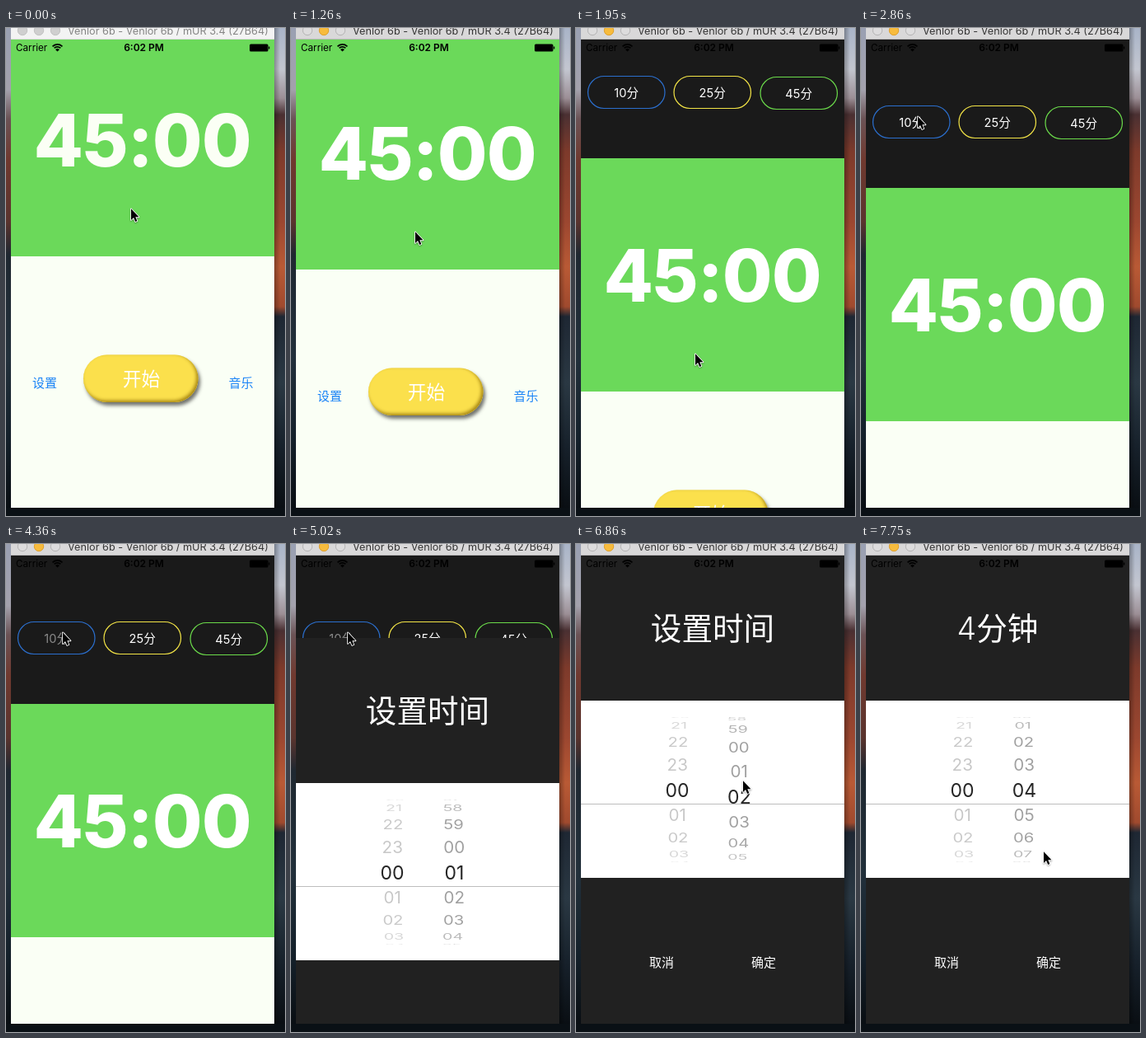
Write an HTML page with a canvas that moves like this. It is 339 px wide and 592 px high and loops after 8 s.

```html
<!DOCTYPE html>
<html lang="zh">
<head>
<meta charset="utf-8">
<title>Timer</title>
<style>
html, body { margin: 0; width: 100%; height: 100%; overflow: hidden; background: #0b0f14; }
canvas { display: block; width: 339px; height: 592px; }
</style>
</head>
<body>
<canvas id="stage"></canvas>
<script>
const W = 339, H = 592, LOOP = 8000;
const FONT = '"Inter", "Noto Sans CJK SC", "Noto Sans CJK", sans-serif';
const canvas = document.getElementById('stage');
const ctx = canvas.getContext('2d');
const ratio = window.devicePixelRatio || 1;
canvas.width = W * ratio;
canvas.height = H * ratio;

// Bursts of motion: start, number of steps, end
const BURSTS = [
  [120, 1, 120], [1200, 14, 1950], [2250, 12, 2860], [4360, 1, 4360], [4840, 10, 5380],
  [5560, 6, 5860], [6340, 3, 6450], [6800, 8, 7220], [7460, 6, 7750]
];
// Tracks: time, then values
const POINTER = [
  [1140, 152, 219], [1604, 148, 328], [1950, 145, 395], [2305, 143, 390], [2800, 72, 116],
  [2860, 69, 107], [5500, 69, 107], [5560, 92, 140], [5860, 204, 288], [6280, 204, 288],
  [6450, 198, 315], [6740, 198, 315], [7100, 213, 232], [7220, 214, 238], [7400, 214, 238],
  [7750, 222, 373]
];
const PULL = [
  [1190, 0], [1604, 95], [1950, 164], [2200, 164], [2310, 180], [2420, 193], [2540, 198], [2650, 200]
];
const MINUTE = [[6740, 1], [6920, 2.1], [7040, 3.2], [7140, 3.8], [7220, 4]];

function snap(t) {
  let s = 0;
  for (const [a, n, b] of BURSTS) {
    if (t < a) break;
    if (t >= b) { s = b; continue; }
    const step = (b - a) / (n - 1);
    s = a + Math.min(n - 1, Math.floor((t - a) / step + .25)) * step;
  }
  return s;
}

function track(keys, t) {
  if (t <= keys[0][0]) return keys[0].slice(1);
  for (let i = 1; i < keys.length; i++) {
    const a = keys[i - 1], b = keys[i];
    if (t <= b[0]) {
      const p = (t - a[0]) / (b[0] - a[0]);
      return a.slice(1).map((v, j) => v + (b[j + 1] - v) * p);
    }
  }
  return keys[keys.length - 1].slice(1);
}

// Critically damped spring for the rising sheet
function sheetOffset(t) {
  if (t >= 5380) return 0;
  const x = 14.35 * (t - 4800) / 1000;
  return x <= 0 ? 568 : Math.round(568 * (1 + x) * Math.exp(-x));
}

function box(x, y, w, h, color) {
  ctx.fillStyle = color;
  ctx.fillRect(x, y, w, h);
}

function text(str, x, y, size, color, weight = 400, align = 'center', spacing = 0) {
  ctx.font = `${weight} ${size}px ${FONT}`;
  ctx.letterSpacing = `${spacing}px`;
  ctx.textAlign = align;
  ctx.fillStyle = color;
  ctx.fillText(str, x, y);
}

function pill(x, y, w, h) {
  const r = h / 2;
  ctx.beginPath();
  ctx.arc(x + r, y + r, r, Math.PI / 2, Math.PI * 1.5);
  ctx.arc(x + w - r, y + r, r, -Math.PI / 2, Math.PI / 2);
  ctx.closePath();
}

function clip(x, y, w, h, draw) {
  ctx.save();
  ctx.beginPath();
  ctx.rect(x, y, w, h);
  ctx.clip();
  draw();
  ctx.restore();
}

function shade(dx, dy, blur, color) {
  ctx.shadowOffsetX = dx * ratio;
  ctx.shadowOffsetY = dy * ratio;
  ctx.shadowBlur = blur * ratio;
  ctx.shadowColor = color;
}

function strip(x, w, stops) {
  const g = ctx.createLinearGradient(0, 0, 0, H);
  for (const [y, color] of stops) g.addColorStop(y / H, color);
  box(x, 0, w, H, g);
}

function wallpaper() {
  strip(0, 6, [[0, '#9aa0b2'], [75, '#a3a1ac'], [110, '#6b5356'], [160, '#70392f'], [235, '#5a342e'],
    [275, '#1f2831'], [400, '#22303b'], [500, '#14202a'], [592, '#080c10']]);
  strip(326, 13, [[0, '#a9b4c8'], [50, '#c3c6d0'], [85, '#9c8f96'], [105, '#4a3032'], [150, '#7d3a2b'],
    [235, '#9c4730'], [290, '#b95a35'], [338, '#a04a2e'], [350, '#1e2733'], [430, '#2a3843'],
    [510, '#16202a'], [592, '#080c10']]);
  const g = ctx.createLinearGradient(326, 0, 333, 0);
  g.addColorStop(0, 'rgba(0,0,0,.3)');
  g.addColorStop(1, 'rgba(0,0,0,0)');
  box(326, 0, 13, H, g);
  box(0, 582, W, 10, '#0a1015');
}

function titleBar(active) {
  box(6, 0, 320, 14, active ? '#d9d8d9' : '#f3f3f3');
  box(6, 13, 320, 1, active ? '#b9b8b9' : '#dcdcdc');
  [20, 40, 60].forEach((x, i) => {
    const amber = active && i === 1;
    ctx.beginPath();
    ctx.arc(x, 3, 5.7, 0, 7);
    ctx.fillStyle = amber ? '#f7bb3d' : active ? '#dddcdd' : '#cfcfcf';
    ctx.strokeStyle = amber ? '#dfa02c' : active ? '#b5b4b5' : '#c2c2c2';
    ctx.lineWidth = 1;
    ctx.fill();
    ctx.stroke();
  });
  text('Venlor 6b - Venlor 6b / mUR 3.4 (27B64)', 75, 7.7, 12.7, active ? '#363636' : '#858585', 400, 'left');
}

function statusBar() {
  text('Carrier', 12, 28, 11.7, '#000', 400, 'left');
  text('6:02 PM', 167.5, 28, 12, '#000', 600);
  ctx.strokeStyle = '#000';
  ctx.lineWidth = 1.7;
  for (const r of [8.2, 5.2]) {
    ctx.beginPath();
    ctx.arc(62.5, 28, r, -Math.PI * .76, -Math.PI * .24);
    ctx.stroke();
  }
  ctx.fillStyle = '#000';
  ctx.beginPath();
  ctx.moveTo(62.5, 28.4);
  ctx.arc(62.5, 28.4, 3.3, -Math.PI * .76, -Math.PI * .24);
  ctx.fill();
  ctx.beginPath();
  ctx.roundRect(296, 19.5, 22.5, 9, 1.5);
  ctx.fill();
  box(319, 22.5, 1.3, 3, '#000');
}

function startButton(y) {
  const shape = () => pill(94, y, 139.5, 57.5);
  ctx.save();
  shade(2.5, 4, 4, 'rgba(0,0,0,.55)');
  shape();
  ctx.fillStyle = '#fbe04c';
  ctx.fill();
  ctx.clip();
  // Inner edge: shadow cast by a ring just outside the pill
  shade(-2, -2, 4, 'rgba(140,105,0,.8)');
  shape();
  ctx.rect(70, y - 30, 190, 120);
  ctx.fillStyle = '#fbe04c';
  ctx.fill('evenodd');
  ctx.restore();
  text('开始', 164.5, y + 37, 22.7, '#fff', 350);
}

function presets(pull, pressed) {
  const y = pull - 106;
  [['10分', 14.5, 0, '#2b6fce'], ['25分', 119, 0, '#f3e446'], ['45分', 224, 1, '#6bdb4a']]
    .forEach(([label, x, dy, color], i) => {
      pill(x, y + dy + .5, 93.5, 39);
      ctx.strokeStyle = color;
      ctx.lineWidth = 1.2;
      ctx.stroke();
      text(label, x + 46.7, y + dy + 25.5, 14.6, pressed && !i ? '#8a8a8a' : '#fff');
    });
}

function mainScreen(pull, white, pressed) {
  box(6, 14, 320, 568, '#1a1a1a');
  presets(pull, pressed);
  box(6, pull - 6, 320, 283, '#6bd95a');
  box(6, pull + 277, 320, 320, '#fafff5');
  text('45:00', 165.5, pull + 168, 88, white, 800, 'center', -1);
  text('设置', 47, pull + 435.5, 15, '#1b84f6');
  text('音乐', 285.5, pull + 435.5, 15, '#1b84f6');
  startButton(pull + 396.5);
}

function wheel(x, y, value, count, color) {
  const base = Math.round(value);
  for (let i = base - 4; i <= base + 4; i++) {
    const turn = (i - value) * 20;
    if (Math.abs(turn) > 84) continue;
    const rad = turn * Math.PI / 180, depth = Math.cos(rad);
    const near = Math.abs(turn) < 10;
    const size = near ? 23 : 20.7;
    const wide = .9 + .1 * depth;
    ctx.save();
    ctx.globalAlpha = near ? 1 : Math.min(1, .22 + depth);
    ctx.translate(162 + (x - 162) * wide, y + 90 * Math.sin(rad));
    ctx.scale(wide, depth);
    text(String((i + count) % count).padStart(2, '0'), 0, size * .364, size, near ? '#262626' : color);
    ctx.restore();
  }
}

function sheet(dy, minute, label) {
  box(6, 14 + dy, 320, 568, '#212121');
  text(label, 166, 116 + dy, 37.6, '#fff', 350);
  box(6, 190 + dy, 320, 215, '#fff');
  clip(6, 210 + dy, 320, 176, () => {
    wheel(123, 298.4 + dy, 0, 24, '#c8c8c8');
    wheel(198.4, 298.4 + dy, minute, 60, '#a0a0a0');
  });
  box(6, 315 + dy, 320, 1, '#bdbdbd');
  text('取消', 104, 512.7 + dy, 15, '#fff');
  text('确定', 228, 512.7 + dy, 15, '#fff');
}

function pointer(x, y) {
  ctx.save();
  ctx.translate(x, y + .3);
  ctx.scale(.93, .93);
  shade(0, 1, 2, 'rgba(0,0,0,.35)');
  const arrow = new Path2D('M0 0V14.6L3.3 11.6L5.6 16.9L7.9 15.9L5.7 10.8H10.2Z');
  ctx.lineJoin = 'round';
  ctx.lineWidth = 1.8;
  ctx.strokeStyle = '#fff';
  ctx.stroke(arrow);
  shade(0, 0, 0, 'transparent');
  ctx.fillStyle = '#000';
  ctx.fill(arrow);
  ctx.restore();
}

function draw(time) {
  const t = snap(time);
  const active = t >= 120;
  const dy = sheetOffset(t);
  const [pull] = track(PULL, t).map(Math.round);
  ctx.setTransform(ratio, 0, 0, ratio, 0, 0);
  wallpaper();
  clip(6, 14, 320, 568, () => {
    mainScreen(pull, active ? '#fff' : '#fbfff5', t >= 4360);
    if (dy < 568) sheet(dy, track(MINUTE, t)[0], t >= 7460 ? '4分钟' : '设置时间');
    statusBar();
  });
  titleBar(active);
  pointer(...track(POINTER, t).map(Math.round));
}

function frame() {
  draw(performance.now() % LOOP);
  requestAnimationFrame(frame);
}
frame();
</script>
</body>
</html>
```
